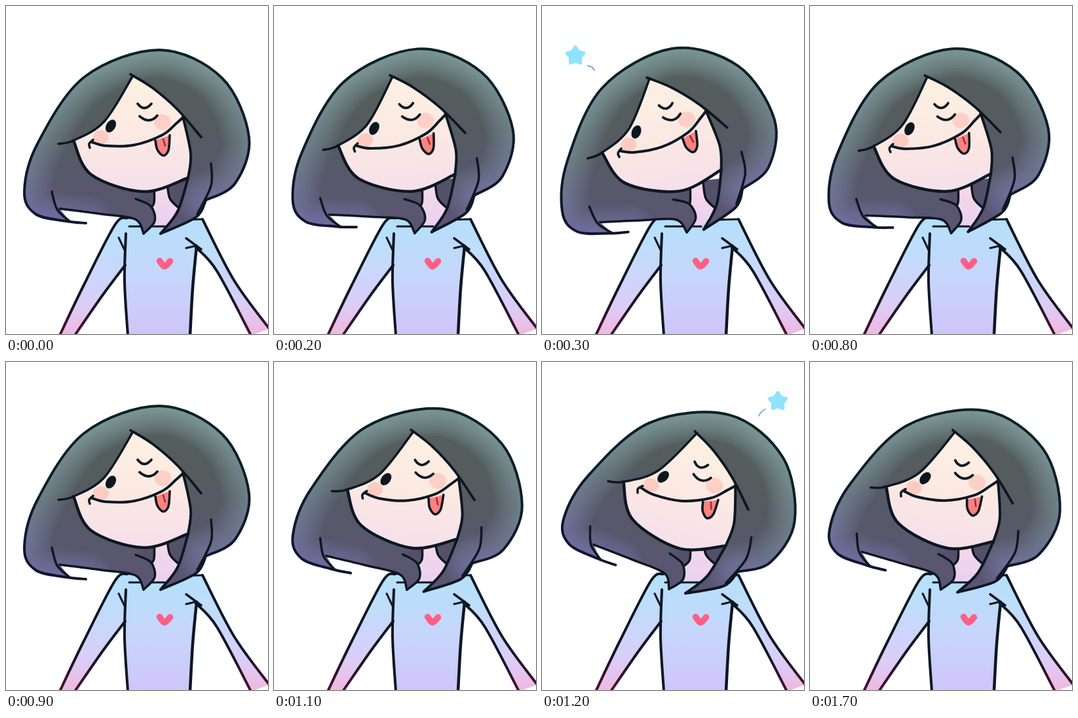
An HTML page with a canvas that plays this animation: 400 by 500 pixels, repeating every 1.8 s.

```html
<!DOCTYPE html>
<html lang="en">
<head>
<meta charset="utf-8">
<title>Head bob</title>
<style>
  html, body { margin: 0; width: 100%; height: 100%; overflow: hidden; background: #fff; }
  canvas { display: block; width: 400px; height: 500px; }
</style>
</head>
<body>
<canvas id="stage" width="400" height="500"></canvas>
<script>
const ctx = document.getElementById('stage').getContext('2d');
const INK = '#0d1722';
const SWAY = 900;                  // one lean to a side and back, ms
const PIVOT = { x: 205, y: 281 };  // the head turns on the neck

// Head angles in degrees
const LEFT = { enter: -4.2, hold: -9.8, leave: -4.8 };
const RIGHT = { enter: 6.2, hold: 14, leave: 9 };

// Key points of the upright head, as x,y pairs
const HAIR = {
  outer: [122,331, 92,328, 45,317, 28,283, 48,210, 120,108, 235,67, 330,110, 371,200, 350,270, 305,296],
  lock: [305,296, 290,322, 236,347],
  inner: [236,347, 262,313, 278,262],
  curl: [210,347, 227,328, 221,305, 198,294],
  under: [82,309, 145,317, 197,325, 210,347],
  strand: [70,283, 78,310, 97,328],
  side: [313,240, 313,274, 292,317]
};
const FACE = {
  fringeL: [194,106, 150,176, 103,205, 80,210],
  fringeR: [190,104, 224,125, 262,158, 298,200],
  chin: [103,205, 130,257, 210,283, 278,262],
  edge: [278,262, 282,225, 270,168]
};

const flip = p => p.map((_, i) => p[p.length - 2 - i + 2 * (i % 2)]);

// Smooth curve through flat x,y points, joined to any current point
function trace(p) {
  const n = p.length / 2;
  const at = (i, a) => p[2 * Math.max(0, Math.min(n - 1, i)) + a];
  const handles = (i, a) => [at(i, a) + (at(i + 1, a) - at(i - 1, a)) / 6,
                             at(i + 1, a) - (at(i + 2, a) - at(i, a)) / 6];
  ctx.lineTo(p[0], p[1]);
  for (let i = 0; i < n - 1; i++) {
    const [x1, x2] = handles(i, 0), [y1, y2] = handles(i, 1);
    ctx.bezierCurveTo(x1, y1, x2, y2, at(i + 1, 0), at(i + 1, 1));
  }
}

function shape(curves, fill) {
  ctx.beginPath();
  curves.forEach(trace);
  ctx.closePath();
  ctx.fillStyle = fill;
  ctx.fill();
}

function line(p, width = 4, color = INK) {
  ctx.beginPath();
  trace(p);
  ctx.lineWidth = width;
  ctx.strokeStyle = color;
  ctx.stroke();
}

function bow(x0, y0, cx, cy, x1, y1) {
  ctx.beginPath();
  ctx.moveTo(x0, y0);
  ctx.quadraticCurveTo(cx, cy, x1, y1);
  ctx.lineWidth = 3.8;
  ctx.strokeStyle = INK;
  ctx.stroke();
}

// Vertical gradient with evenly spaced colours
function shade(y0, y1, ...colors) {
  const g = ctx.createLinearGradient(0, y0, 0, y1);
  colors.forEach((c, i) => g.addColorStop(i / (colors.length - 1), c));
  return g;
}

function oval(x, y, rx, ry, turn, fill) {
  ctx.beginPath();
  ctx.ellipse(x, y, rx, ry, turn, 0, 7);
  ctx.fillStyle = fill;
  ctx.fill();
}

function drawNeck() {
  shape([[186, 284], [226, 268], [282, 262], [274, 292], [264, 309], [206, 314]], '#55506a');
  shape([[226, 265], [226, 300, 218, 311], [206, 335], [245, 335], [264, 309, 250, 293, 246, 265]],
    shade(265, 336, '#f7dbe4', '#e9d0f2'));
  line([246, 268, 250, 293, 264, 308], 3.5);
  line([226, 270, 226, 300, 218, 310], 3.5);
}

function drawBody() {
  const arm = shade(325, 500, '#b3e1fa', '#bfdefb', '#ccd5fb', '#dccdf7', '#efb9e0');
  const ink = shade(440, 500, INK, '#4a1033');
  const outL = [185, 323, 166, 334, 118, 427, 82, 502];
  const inL = [105, 502, 148, 440, 182, 395];
  const outR = [300, 325, 348, 418, 402, 492];
  const inR = [374, 502, 322, 404, 290, 368];
  const torsoL = [183, 347, 181, 420, 186, 502];
  const torsoR = [281, 502, 285, 430, 291, 366];
  shape([outL, inL, [184, 330]], arm);
  shape([[276, 326], outR, inR], arm);
  shape([[184, 324], torsoL, torsoR, [300, 345], [298, 325]], shade(325, 500, '#b4e0fa', '#c6d6fb', '#d0c5fb'));
  drawNeck();
  [outL, inL, outR, inR].forEach(p => line(p, 4, ink));
  line(torsoL);
  line(torsoR, 4.5);
  line([188, 336, 243, 336], 3);
  line([185, 323, 210, 323], 3);
  line([265, 326, 300, 325], 3);
  line([172, 353, 181, 372], 3);
  line([275, 354, 298, 371], 3.5);
  line([275, 369, 288, 366], 3);
  line([234.5, 388.5, 242, 397, 250.5, 389], 9.5, '#ff5f87');
}

function drawHair() {
  const { outer, lock, inner, curl, under, strand, side } = HAIR;
  shape([outer, lock, inner, [230, 275], flip(curl), flip(under), strand.slice(-2)],
    shade(68, 350, '#566160', '#545c5d', '#57586a' , '#5b5474'));
  ctx.save();
  ctx.clip();
  const sheen = shade(100, 330, 'rgba(150,190,188,.075)', 'rgba(135,165,175,.06)', 'rgba(130,122,200,.07)');
  for (let w = 12; w <= 84; w += 8) line(outer, w, sheen);
  ctx.restore();
  const rim = shade(68, 340, '#0b2225', '#101530');
  line(outer, 4, rim);
  [lock, inner].forEach(p => line(p));
  [under, curl, strand, side].forEach(p => line(p, 3.5));
}

function drawFace() {
  const { fringeL, fringeR, chin, edge } = FACE;
  shape([fringeL.slice(0, 6), chin, edge, flip(fringeR.slice(0, 6))],
    shade(110, 285, '#fdf0e2', '#fbe9e2', '#f5dfeb'));
  oval(145, 200, 12, 10.5, 0, '#fccbc1');
  oval(239, 177, 13, 12, 0, '#fcd0c6');
  oval(160, 183, 7, 10.5, .55, INK);
  bow(201, 149, 211, 162, 222, 149);
  bow(204, 168, 219, 181, 231, 167);

  const tongue = [228, 205, 231, 219, 240, 228, 248, 220, 250, 197];
  shape([tongue], '#fb8380');
  line(tongue, 3.6);
  line([240, 203, 243, 213], 2.6, '#a02c3c');
  line([130, 207, 152, 213, 195, 212, 238, 197, 260, 179, 270, 170]);
  line([128, 216, 127, 210, 133, 204], 3.6);

  line(chin, 4.5);
  line(edge);
  line(fringeL, 3.5);
  line(fringeR, 3.8);
}

function drawStar(x, y) {
  ctx.beginPath();
  for (let i = 0; i < 10; i++) {
    const a = i * Math.PI / 5, r = i % 2 ? 8.5 : 14;
    ctx.lineTo(x + r * Math.sin(a), y - r * Math.cos(a));
  }
  ctx.closePath();
  ctx.fillStyle = ctx.strokeStyle = '#8fe3ff';
  ctx.lineWidth = 4;
  ctx.fill();
  ctx.stroke();
}

function draw(angle) {
  ctx.fillStyle = '#fff';
  ctx.fillRect(0, 0, 400, 500);
  ctx.lineCap = ctx.lineJoin = 'round';
  drawBody();
  ctx.save();
  ctx.translate(PIVOT.x, PIVOT.y);
  ctx.rotate(angle * Math.PI / 180);
  ctx.translate(-PIVOT.x, -PIVOT.y);
  drawHair();
  drawFace();
  ctx.restore();
  if (angle === LEFT.hold) {
    drawStar(51, 76);
    line([70, 91, 76, 93, 80, 98], 1.8, '#5d9be6');
  } else if (angle === RIGHT.hold) {
    drawStar(360, 60);
    line([331, 82, 335, 76, 341, 72], 1.8, '#62b4ee');
  }
}

function angleAt(time) {
  const lean = time % (2 * SWAY) < SWAY ? LEFT : RIGHT;
  const t = time % SWAY;
  if (t < 200) return 0;
  if (t < 300) return lean.enter;
  return t < 800 ? lean.hold : lean.leave;
}

let shown = null;
function tick() {
  const angle = angleAt(performance.now());
  if (angle !== shown) draw(shown = angle);
  requestAnimationFrame(tick);
}
tick();
</script>
</body>
</html>
```
